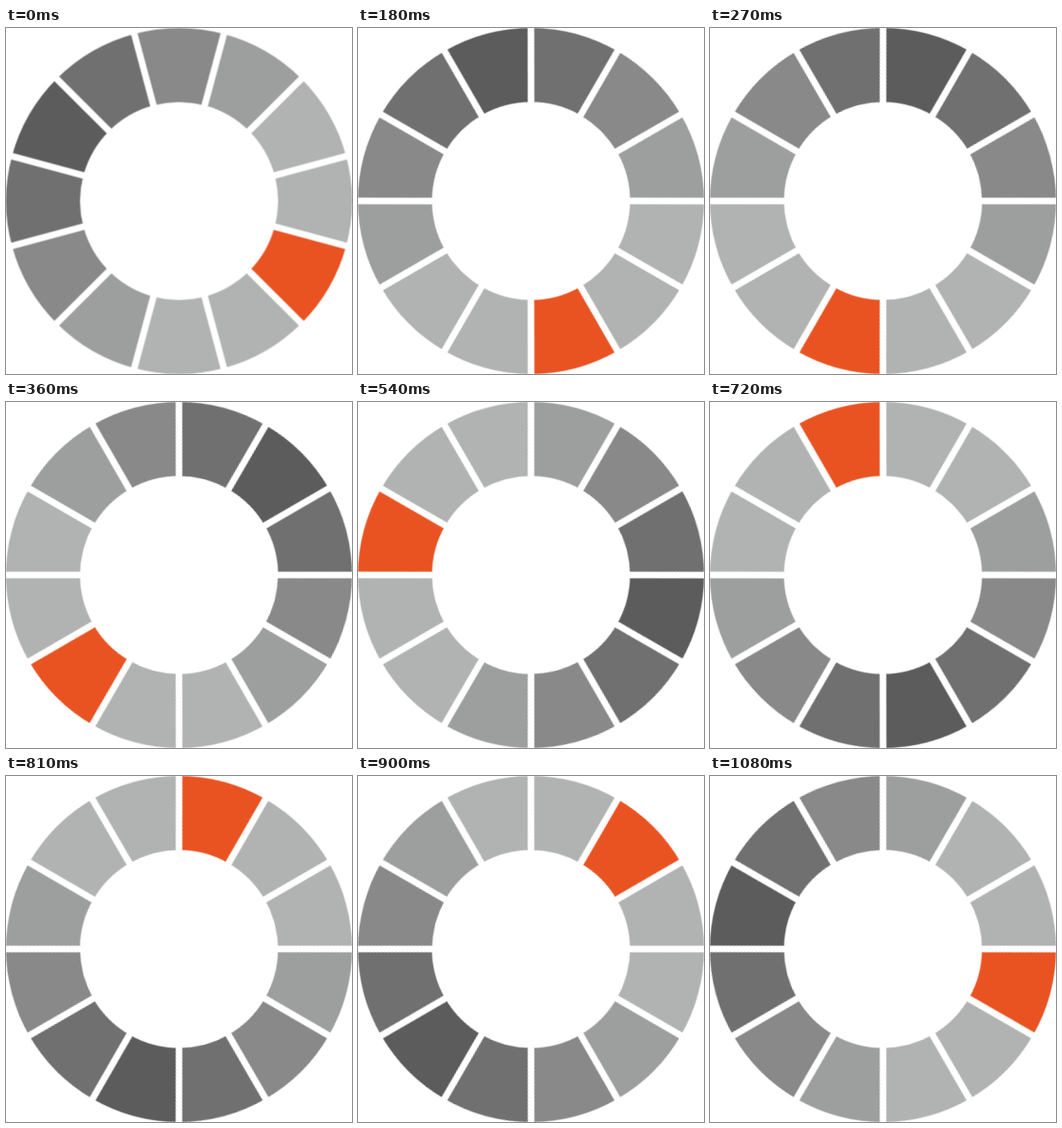
These frames come from a looping animation (367x367 px, 1.17 s). An HTML page:

```html
<!DOCTYPE html>
<html lang="en">
<head>
<meta charset="utf-8">
<title>Loading ring</title>
<style>
  html, body { margin: 0; width: 100%; height: 100%; overflow: hidden; background: #fff; }
  svg { display: block; width: 367px; height: 367px; }
  #ring { animation: turn 1170ms infinite; }
  /* One half step first, then twelve full steps of 30 degrees */
  @keyframes turn {
    0% { transform: rotate(0deg); animation-timing-function: step-end; }
    7.6923% { transform: rotate(15deg); animation-timing-function: steps(12, end); }
    100% { transform: rotate(375deg); }
  }
</style>
</head>
<body>
<svg viewBox="-183.5 -183.5 367 367"><g id="ring"></g></svg>
<script>
  const OUTER = 183.5, INNER = 105, GAP = 7, COUNT = 12, START = 30;
  const GREYS = ['#b1b3b2', '#b1b3b2', '#9d9f9e', '#888988', '#707070', '#5b5c5b'];
  const ring = document.getElementById('ring');

  const point = (radius, degrees) => {
    const a = degrees * Math.PI / 180;
    return `${radius * Math.cos(a)} ${radius * Math.sin(a)}`;
  };

  const addPath = attrs => {
    const path = document.createElementNS('http://www.w3.org/2000/svg', 'path');
    for (const name in attrs) path.setAttribute(name, attrs[name]);
    ring.append(path);
  };

  // Shades darken symmetrically towards the side opposite the accent
  const colour = i => i === 0 ? '#e95322' : GREYS[Math.min(i, COUNT - i) - 1];

  for (let i = 0; i < COUNT; i++) {
    const from = START + i * 30 - 15, to = from + 30;
    addPath({
      d: `M${point(OUTER, from)} A${OUTER} ${OUTER} 0 0 1 ${point(OUTER, to)}
          L${point(INNER, to)} A${INNER} ${INNER} 0 0 0 ${point(INNER, from)} Z`,
      fill: colour(i)
    });
  }

  for (let i = 0; i < COUNT; i++) {
    const angle = START + i * 30 - 15;
    addPath({
      d: `M${point(INNER - 4, angle)} L${point(OUTER + 4, angle)}`,
      stroke: '#fff',
      'stroke-width': GAP
    });
  }
</script>
</body>
</html>
```
